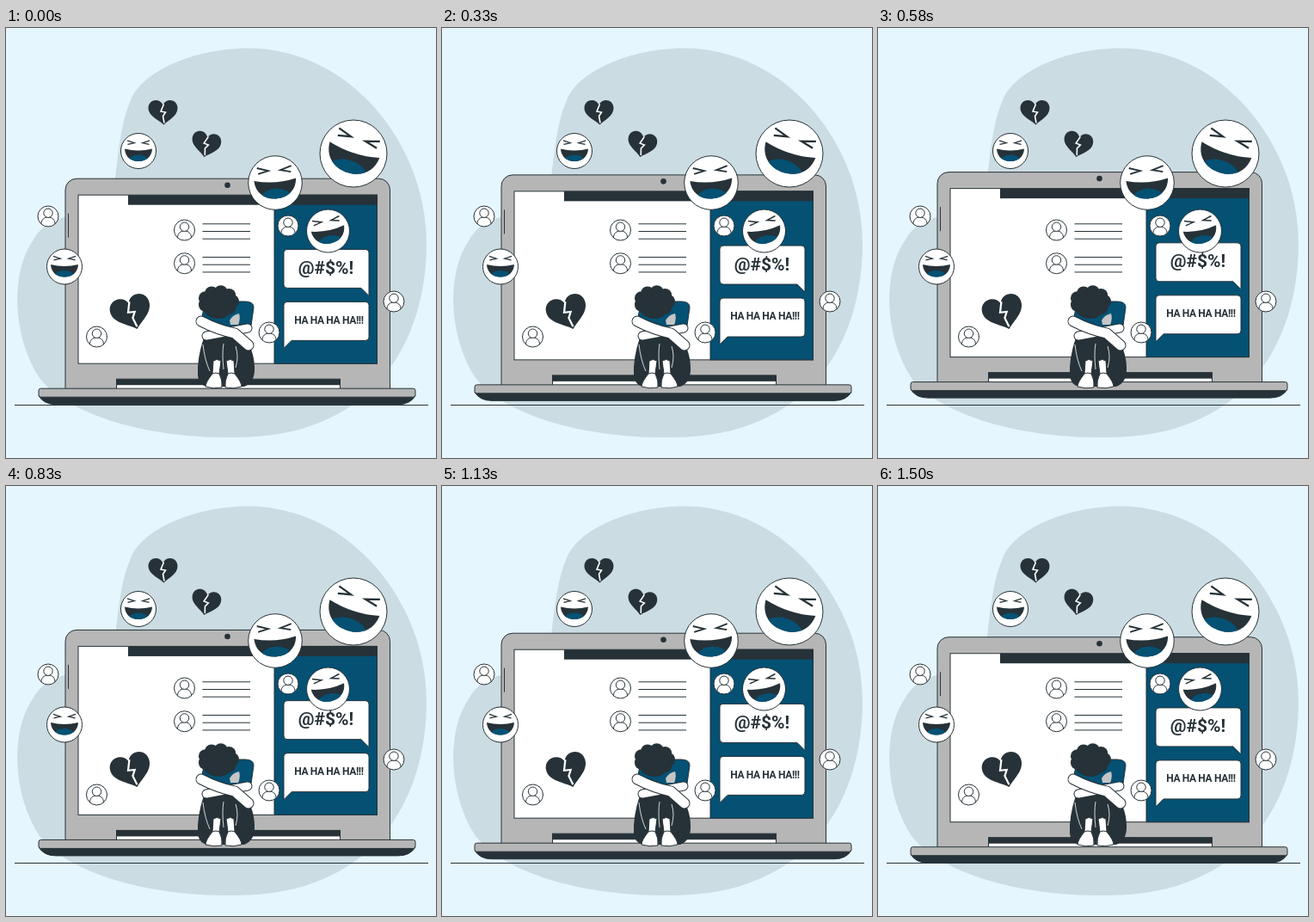
An HTML page that plays this animation: 500 by 500 pixels, repeating every 1.54 s.

```html
<!DOCTYPE html>
<html lang="en">
<head>
<meta charset="utf-8">
<title>Floating laptop</title>
<style>
  html, body { margin: 0; width: 100%; height: 100%; overflow: hidden; background: #e6f6fe; }
  svg { display: block; width: 100vw; height: 100vh; }
  .ink { fill: #263238; }
  .blue { fill: #045174; }
  .paper { fill: #fff; }
  .metal { fill: #b6b6b6; }
  .edge { stroke: #263238; }
  .line { fill: none; stroke: #263238; }
  .chalk { fill: none; stroke: #fff; }
  .limb { fill: none; stroke-linecap: round; stroke-linejoin: round; }
  text { font-family: Roboto, "Open Sans", sans-serif; font-weight: 700; fill: #263238; text-anchor: middle; }
</style>
</head>
<body>
<svg viewBox="0 0 500 500">
  <defs>
    <path id="mouth" d="M-.78-.12Q0 .08 .78-.12C.76 .32 .44 .59 0 .59S-.76 .32-.78-.12Z"/>
    <path id="eye" class="line" stroke-width=".06" d="M.64-.59L.23-.46L.61-.37"/>
    <clipPath id="inMouth"><use href="#mouth"/></clipPath>
    <g id="laugh">
      <circle class="paper" r="1"/>
      <use href="#mouth" class="ink"/>
      <ellipse class="blue" cy=".6" rx=".6" ry=".38" clip-path="url(#inMouth)"/>
      <use href="#eye"/>
      <use href="#eye" transform="scale(-1 1)"/>
    </g>
    <g id="user">
      <circle class="paper edge" r="12"/>
      <path class="line" d="M-8 9C-8 4-5 1 0 1S8 4 8 9"/>
      <circle class="paper edge" cy="-3.8" r="5.2"/>
    </g>
    <g id="heart">
      <path class="ink" d="M1 15C-5 9-17 5-17-4.500C-17-14.500-4-17 0-8C4-17 17-14.500 17-4.500C17 5 7 9 1 15Z"/>
      <path class="chalk" stroke-width="1.600" d="M1-9L-2.500-.5L3 .5L0 5L1.500 13"/>
    </g>
    <g id="foot">
      <path class="paper edge" d="M-12 387Q-8 384-3 387L-5 402Q-1 410-2 418Q-12 420-21 417Q-21 412-13 402Z"/>
      <path class="line" d="M-13 402Q-9 400-5 402"/>
    </g>
  </defs>

  <path fill="#ccdce3" d="M123 200C130 165 130 118 145 84C158 50 220 23.500 282 23.500C400 24 489 135 489 250C489 368 425 475 270 476C165 478 72 450 39 407C8 360 4 285 32 246C56 204 118 225 123 200Z"/>
  <path class="line" d="M10 438.500H491"/>
  <g id="laptop">
    <rect class="metal edge" x="69" y="175.500" width="377.500" height="260" rx="13"/>
    <path class="line" d="M72.500 216V244"/>
    <circle class="ink" cx="257.500" cy="183" r="3.300"/>
    <rect class="paper edge" x="84" y="194.500" width="347.500" height="196"/>
    <rect class="blue edge" x="312" y="194.500" width="119.500" height="196"/>
    <rect class="ink" x="142" y="194.500" width="289.500" height="11.500"/>
    <rect class="paper edge" x="128.500" y="408.500" width="260" height="12"/>
    <rect class="ink" x="128.500" y="408.500" width="260" height="7"/>
    <path class="ink edge" d="M38 428H476Q470 438 456 438H58Q44 438 38 428Z"/>
    <rect class="metal edge" x="38" y="419.500" width="438" height="10" rx="2.500"/>
  </g>
  <g id="icons"></g>
  <g id="person">
    <path class="blue edge" d="M228 336L231 321Q233 317 242 318H278Q288 318 288 325L285 346L262 349Z"/>
    <g id="hair" class="ink"></g>
    <path fill="#c5c5c5" d="M260 340Q264 333 271 332Q273 338 270 345H261Z"/>
    <path class="ink" d="M230 360Q222 384 223 404Q225 418 238 417H277Q290 412 289 394Q288 372 276 360L254 356Z"/>
    <path class="chalk" stroke-width=".8" d="M229 368Q231 386 237 399M253 367Q251 379 253 397M267 370Q271 382 267 395"/>
    <g id="arms"></g>
    <use href="#foot" x="253"/>
    <use href="#foot" transform="translate(253) scale(-1 1)"/>
  </g>
</svg>
<script>
  const add = (id, markup) => document.getElementById(id).insertAdjacentHTML('beforeend', markup);
  const place = (id, x, y, scale = 1, turn = 0) =>
    add('icons', `<use href="#${id}" transform="translate(${x} ${y}) rotate(${turn}) scale(${scale})"/>`);

  function laugh(x, y, r, turn) {
    place('laugh', x, y, r, turn);
    add('icons', `<circle class="line" cx="${x}" cy="${y}" r="${r}"/>`);
  }

  // Speech bubble whose tail hangs from the left (side -1) or right (side 1) corner.
  function bubble(y, side, words, size, spacing) {
    const tail = 372.5 + side * 49.5;
    add('laptop', `<rect class="paper edge" x="323" y="${y}" width="99" height="45" rx="4"/>
      <path class="paper" d="M${tail} ${y + 39}v15l${-9 * side} -9v-6z"/>
      <path class="line" d="M${tail} ${y + 39}v15l${-9 * side} -9"/>
      <text x="${372 + size / 21 * (side < 0 ? 6 : 0)}" y="${y + 21 + size * 0.36}"
        font-size="${size}" letter-spacing="${spacing}">${words}</text>`);
  }

  function message(y) {
    place('user', 207.5, y);
    for (let i = -1; i <= 1; i++) add('icons', `<path class="line" d="M228.5 ${y + 1.5 + i * 8.7}H284"/>`);
  }

  // White tube with a thin dark outline.
  const limb = (path, width) => add('arms', [['#263238', width + 1], ['#fff', width - 1]].map(([color, w]) =>
    `<path class="limb" stroke="${color}" stroke-width="${w}" d="${path}"/>`).join(''));

  bubble(257.7, 1, '@#$%!', 21, 0);
  bubble(318.7, -1, 'HA HA HA HA!!!', 12, -0.35);

  message(235);
  message(273.7);
  for (const [x, y] of [[49, 219], [328, 230], [306, 354], [105.5, 359], [451, 318]]) place('user', x, y);

  place('heart', 182.5, 97.5);
  place('heart', 232.5, 135, 1, 12);
  place('heart', 145.5, 330.5, 1.38, -16);

  laugh(154, 143, 20.5, 0);
  laugh(313, 180, 31.3, -4);
  laugh(404, 146, 39, 18);
  laugh(374.5, 236, 25, -11);
  laugh(68, 277.5, 20.5, 0);

  const LOBES = 9;
  add('hair', '<ellipse cx="247" cy="320" rx="19" ry="18"/>');
  for (let i = 0; i < LOBES; i++) {
    const angle = i / LOBES * 2 * Math.PI;
    add('hair', `<circle cx="${247 + 16 * Math.cos(angle)}" cy="${318 + 11 * Math.sin(angle)}" r="8"/>`);
  }

  limb('M281 349L265 352L233 358', 10);
  limb('M227 341Q246 351 266 355L282 369', 12);

  const LOOP = 1540, STEPS = 37, RISE = 10, LEAD = 55, REST = 0.4;
  const laptop = document.getElementById('laptop');

  // Linear rise and fall, shown in steps of 1/24 s.
  function draw(now) {
    const step = Math.floor((now % LOOP) / LOOP * STEPS + 0.1);
    const phase = (step / STEPS + LEAD / LOOP) % 1;
    const lift = RISE * (1 - Math.abs(2 * phase - 1));
    laptop.setAttribute('transform', `translate(0 ${REST - lift})`);
    requestAnimationFrame(draw);
  }
  draw(performance.now());
</script>
</body>
</html>
```
